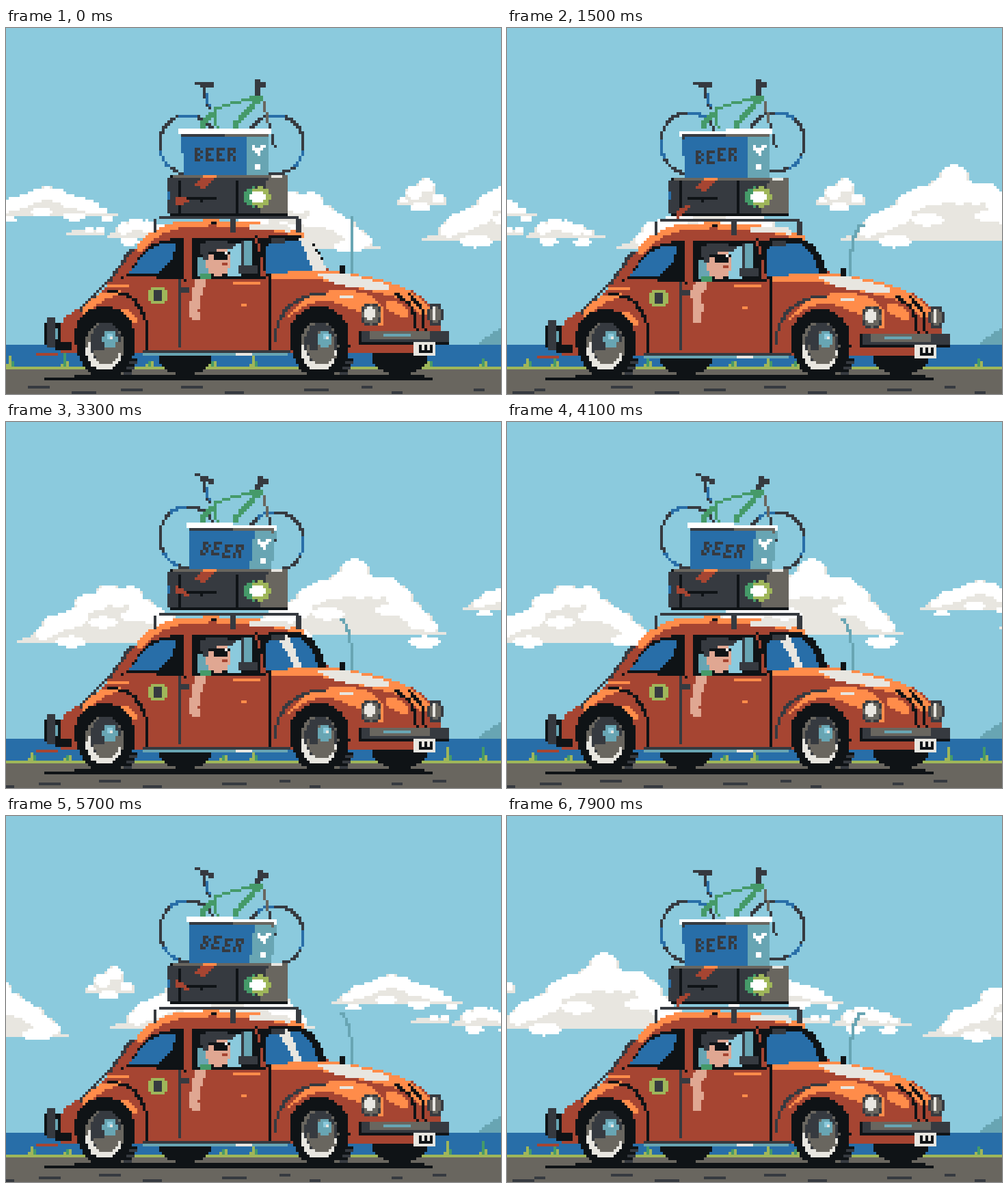
Write an HTML page with a canvas that moves like this. It is 724 px wide and 535 px high and loops after 8 s.

```html
<!DOCTYPE html>
<html lang="en">
<head>
<meta charset="utf-8">
<title>Road trip</title>
<style>
html, body { margin: 0; width: 100%; height: 100%; overflow: hidden; background: #8bcadd; }
canvas { position: absolute; left: 0; top: -1px; width: 724px; height: 536px; image-rendering: pixelated; }
</style>
</head>
<body>
<canvas width="181" height="134" role="img" aria-label="Loaded car on a coast road, cooler box marked BEER"></canvas>
<script>
const ctx = document.querySelector('canvas').getContext('2d');
const K = '#0f1316', D = '#363a40', G = '#69665f', R = '#a64532', O = '#ff8c4a', W = '#fff', C = '#e8e6e0',
  S = '#8bcadd', T = '#68a5b3', B = '#286ea8', V = '#459a69', L = '#9fb65a', SKIN = '#e0a792';
let ox = 0, oy = 0;

const rand = seed => {
  const v = Math.sin(seed * 127.1 + 3.7) * 43758.5453;
  return v - Math.floor(v);
};

// All shapes are snapped to whole cells, without smoothing.
function rect(color, x, y, w, h) {
  ctx.fillStyle = color;
  ctx.fillRect(Math.round(x + ox), Math.round(y + oy), w, h);
}
function poly(color, ...p) {
  const ys = p.filter((_, i) => i % 2);
  for (let y = Math.floor(Math.min(...ys)); y < Math.max(...ys); y++) {
    const xs = [], m = y + .5;
    for (let i = 0; i < p.length; i += 2) {
      const j = (i + 2) % p.length, y0 = p[i + 1], y1 = p[j + 1];
      if ((y0 <= m) !== (y1 <= m)) xs.push(p[i] + (m - y0) / (y1 - y0) * (p[j] - p[i]));
    }
    xs.sort((a, b) => a - b);
    for (let i = 0; i + 1 < xs.length; i += 2) {
      const x = Math.round(xs[i]);
      rect(color, x, y, Math.round(xs[i + 1]) - x, 1);
    }
  }
}
// Catmull-Rom curve through key points; a doubled point makes a corner.
function spline(p, closed, steps) {
  const n = p.length / 2, out = [];
  const at = (i, axis) => p[2 * (closed ? (i + n) % n : Math.min(n - 1, Math.max(0, i))) + axis];
  for (let i = 0; i < (closed ? n : n - 1); i++)
    for (let k = 0; k <= steps; k++)
      for (const axis of [0, 1]) {
        const t = k / steps, [a, b, c, d] = [-1, 0, 1, 2].map(j => at(i + j, axis));
        out.push(b + t / 2 * (c - a + t * (2 * a - 5 * b + 4 * c - d + t * (3 * (b - c) + d - a))));
      }
  return out;
}
const blob = (color, ...p) => poly(color, ...spline(p, true, 6));
function stroke(color, width, ...p) {
  const q = spline(p, false, 26);
  for (let i = 0; i < q.length; i += 2) rect(color, Math.floor(q[i]), Math.floor(q[i + 1]), width, width);
}
function oval(color, cx, cy, rx, ry) {
  for (let y = Math.floor(cy - ry); y < cy + ry; y++) {
    const k = 1 - ((y + .5 - cy) / ry) ** 2;
    if (k <= 0) continue;
    const x = Math.round(cx - rx * Math.sqrt(k));
    rect(color, x, y, Math.round(cx + rx * Math.sqrt(k)) - x, 1);
  }
}
// Repeats a 240-cell wide strip that has moved left by `shift`.
function scroll(shift, draw) {
  for (const k of [-240, 0, 240]) {
    ox = k - shift % 240;
    draw();
  }
  ox = 0;
}

// A flat base with puffs that rise towards the peak, lit from above.
function cloud(x, width, base, height, peak) {
  const count = Math.round(width / 4), puffs = [];
  for (let i = 0; i < count; i++) {
    const t = (i + .5) / count, edge = Math.min(t / peak, (1 - t) / (1 - peak));
    const tall = 1 + height * Math.max(0, edge * 1.2 - .15) ** .7 * (.8 + .25 * rand(i + x));
    puffs.push({ x: x + width * t, top: base - tall, r: Math.min(tall / 2, 2 + height / 10) });
  }
  rect(C, x, base - 1, width, 1);
  rect(C, x + 2, base - 2, width - 6, 1);
  for (const p of puffs) {
    oval(C, p.x, p.top + p.r, p.r * 1.2, p.r);
    poly(C, p.x - p.r * 1.2,p.top + p.r, p.x + p.r * 1.2,p.top + p.r, p.x + p.r * 1.2,base, p.x - p.r * 1.2,base);
  }
  puffs.forEach((p, i) => {
    if (p.r < 1.5) return;
    oval(W, p.x, p.top + p.r * .8, p.r, p.r * .8);
    if (i % 3 === 1) oval(W, p.x + 2, p.top + p.r * 2.6, p.r * 1.3, p.r * .5);
  });
}
function clouds() {
  cloud(-7, 48, 69, 11, .45);
  cloud(22, 14, 76, 3, .8);
  cloud(37, 29, 77, 7, .35);
  cloud(70, 67, 81, 22, .57);
  cloud(143, 17, 65, 10, .6);
  cloud(152, 75, 78, 26, .57);
}

function roadside() {
  for (let i = 0; i < 16; i++) {
    const x = 15 * i + Math.floor(12 * rand(i)), h = 2 + Math.floor(4 * rand(i + 40));
    rect(i % 2 ? V : L, x, 124 - h, 1, h);
    rect(i % 2 ? L : V, x + 1, 122, 1, 2);
    rect(L, x - 1, 123, 1, 1);
  }
  for (let i = 0; i < 12; i++)
    rect(D, 20 * i + 14 * rand(i + 80), 131 + i * 2 % 3, 3 + Math.floor(7 * rand(i + 60)), 1);
}

function bike(s) {
  const ring = (cx, cy, ry) => {
    for (let a = 0; a < 6.28; a += .03) {
      const x = cx + 10.3 * Math.cos(a), y = cy + ry * Math.sin(a);
      rect(Math.sin(a * 3 + s) > .55 ? B : D, Math.floor(x), Math.floor(y), 1, 1);
    }
  };
  ring(66.5, s ? 42.3 : 42.8, s ? 11.2 : 10.8);
  ring(98.5, 42.8 + s, 10.8);
  stroke(D, 1, 72,22, 74,29);
  stroke(B, 1, 73,24, 74,28);
  stroke(V, 1, 76,30, 92,25);
  for (const k of [0, 1]) {
    stroke(V, 1, 92 + k,26, 83 + k,36);
    stroke(V, 1, 75,31 + k, 71 + k,36);
  }
  stroke(V, 1, 76,31, 77,36);
  rect(V, 89, 25, 5, 2);
  stroke(G, 1, 94,27, 96,35);
  stroke(D, 1, 96,35, 98,43);
  for (let i = 0; i < 7; i++)
    rect(D, 69 + i - (s < 0), 20 + (s > 0 ? Math.round((i - 3) / 3) : 0), 1, i > 1 ? 2 : 1);
  // stem and bars
  rect(D, 91 + Math.max(s, 0), 19 + Math.max(s, 0), 2, 4);
  rect(D, 93 + Math.max(s, 0), 20 + Math.max(s, 0), 2, 2);
  rect(D, 91, 23, 2, 2);
}

// Rows of three cells each, as bits.
const glyphs = { B: [6, 5, 6, 5, 6], E: [7, 4, 6, 4, 7], R: [7, 5, 6, 5, 5] };
function cooler(s) {
  const dx = s > 0 ? 3 : 0, left = 37 + (s < 0), right = 37 + (s > 0), bottom = 54 + Math.abs(s);
  poly(B, 64 + dx,39, 88 + dx,39, 88 + dx / 3,bottom, 65 + dx * .7,bottom);
  poly(T, 88 + dx,39, 96 + dx,39, 96 + dx / 3,bottom, 88 + dx / 3,bottom);
  poly(W, 63 + dx,left, 97 + dx * .7,right, 97 + dx * .7,right + 2, 63 + dx,left + 2);
  stroke(D, 1, 64 + dx,left + 2, 79 + dx,39);
  stroke(G, 1, 80 + dx,39, 95 + dx * .8,right + 2);
  const x = 90 + Math.max(0, s) * 2;
  stroke(W, 1, x,43, x + 2,46, x + 4,43);
  rect(W, x + 1, 50, 2, 2);
  [...'BEER'].forEach((ch, i) => glyphs[ch].forEach((bits, row) => {
    const x0 = 69 + i * 4 + (s > 0 ? 3 - (row > 2) : 0);
    const y0 = 44 + row + (s > 0 ? i >> 1 : s < 0 ? 1 - (i >> 1) : 0);
    for (let k = 0; k < 3; k++) if (bits & 4 >> k) rect(D, x0 + k, y0, 1, 1);
  }));
}

function suitcase(s) {
  const top = 54 + (s < 0);
  rect(K, 60, top, 43, 69 - top);
  rect(D, 59, top + 1, 43, 67 - top);
  poly(G, 96,top, 103,top, 103,68, 93,68);
  rect(G, 61, top, 36, 1);
  rect(C, 97, top, 4, 1);
  rect(B, 59, 60, 1, 3);
  for (const x of [63, 84]) rect(K, x, 56, 1, 12);
  rect(O, 72, top, 5, 1);
  poly(R, 71,top + 1, 76,top + 1, 73,top + 5, 69,top + 4);
  stroke(K, 1, 66,62, 71,63, 76,62);
  const tag = 62 + (s < 0 ? 3 : 0);
  poly(R, 62,tag - s * 2, 66,tag, 67,tag + 2 - (s < 0), 62,tag + 3 - s * 2);
  oval(V, 90.5, 62, 3.6, 3.6);
  oval(L, 93, 62, 3.6, 3.6);
  oval(W, 92, 62, 3, 2.5);
}

function rack() {
  rect(D, 56, 69, 51, 1);
  for (const x of [54, 82, 106]) rect(D, x, 70, x > 54 ? 2 : 1, 5);
  rect(K, 75, 71, 2, 1);
}

function driver(s) {
  poly(K, 68,77, 91,77, 93,84, 93,92, 68,92);
  rect(T, 70, 84, 4, 7);
  rect(S, 81, 79, 5, 12);
  rect(T, 87, 78, 3, 12);
  rect(D, 86, 78, 1, 9);
  oval(SKIN, 77.5, 85.5, 4.5, 5.5);
  blob(D, 71,80, 75,78, 83,79, 82,81, 75,82, 73,86);
  rect(K, 74, 82, 8, 1);
  rect(K, 76, 83, 5, 2);
  rect(W, 80, 82, 1, 1);
  rect(R, 79, 86, 2, 1);
  rect(D, 85, 87, 7, 3);
  rect(V, 71, 90, 4, 2);
  stroke(SKIN, 3, 70,92, s < 0 ? 68 : 69,95, s < 0 ? 69 : 68,100, 68,104);
}

function glass(phase) {
  blob(K, 44,91, 44,91, 51,81, 58,78, 65,77, 65,77, 65,92, 65,92);
  poly(B, 45,90, 51,82, 57,79, 62,79, 61,85, 55,90);
  blob(K, 92,77, 92,77, 106,76, 113,80, 118,90, 118,90, 95,91, 95,91);
  poly(B, 95,90, 95,81, 97,78, 107,78, 111,81, 115,90);
  // a reflection slides across the windscreen
  const x = 107 - 8 * phase;
  if (phase < 2) poly(C, x,77, x + 4,77, x + 11 - phase,90, x + 6 + phase,90);
  rect(D, 97, 77, 5, 2);
}

function lamp(cx, rx) {
  oval(D, cx, 105, rx, 4.4);
  oval(G, cx, 105, rx - .8, 3.6);
  oval(C, cx - .5, 104.5, rx - 2, 2.6);
}

function body(s, phase) {
  blob(R, 20,119, 20,119, 21,107, 34,98, 42,86, 55,75, 70,71, 92,72, 108,76, 118,89, 118,89, 140,93, 155,101, 160,113, 160,113, 149,119, 149,119);
  // roof and rear
  stroke(O, 2, 48,80, 58,73, 72,71, 92,72, 107,75);
  stroke(C, 2, 89,72, 102,73);
  stroke(D, 1, 27,103, 38,92, 46,81);
  stroke(O, 1, 37,94, 44,94);
  stroke(O, 2, 28,104, 33,99, 40,96);
  stroke(O, 2, 42,103, 46,106);
  stroke(K, 1, 37,96, 46,99, 51,107, 51,117);
  glass(phase);
  rect(K, 122, 87, 2, 3);
  // rear bumper
  rect(K, 14, 108, 6, 8);
  rect(D, 15, 106, 3, 11);
  rect(T, 18, 110, 1, 4);
  rect(K, 18, 115, 6, 3);
  // hood and front fender
  blob(O, 97,90, 97,90, 117,89, 140,93, 154,101, 152,105, 143,99, 127,95, 112,92, 97,92);
  blob(C, 114,90, 123,90, 139,94, 137,96, 122,94);
  blob(O, 103,106, 110,99, 122,96, 133,98, 138,103, 137,109, 129,104, 117,100, 109,102);
  rect(C, 122, 98, 5, 1);
  stroke(O, 3, 139,100, 144,103);
  stroke(K, 1, 142,97, 148,102, 150,110);
  stroke(K, 1, 147,97, 152,103, 153,110);
  stroke(D, 1, 98,114, 101,105, 108,99, 116,97);
  // doors and sill
  rect(D, 63, 92, 1, 25);
  rect(K, 96, 91, 1, 27);
  rect(D, 50, 118, 54, 1);
  rect(T, 50, 119, 53, 1);
  rect(C, 84, 119, 6, 1);
  rect(D, 63, 95, 4, 2);
  rect(O, 83, 93, 10, 1);
  rect(O, 86, 101, 2, 1);
  oval(L, 55.5, 98, 3.6, 3.3);
  oval(D, 55.5, 98, 2, 2);
  driver(s);
  // arches, lamps, front bumper
  for (const x of [36, 114.5]) oval(K, x, 113, 11, 11);
  lamp(133.5, 4);
  lamp(157, 2.8);
  rect(K, 129, 111, 33, 5);
  rect(D, 130, 111, 32, 4);
  rect(G, 133, 111, 22, 3);
  rect(T, 138, 112, 10, 1);
  rect(C, 149, 115, 8, 5);
  for (const x of [151, 153, 155]) rect(K, x, 116, 1, 3);
  rect(K, 151, 118, 5, 1);
}

function wheel(cx) {
  oval(K, cx + .5, 116.5, 10.5, 11.5);
  for (let i = 0; i < 3; i++) {
    rect(K, cx + 7, 121 + 2 * i, 5 - i, 2);
    rect(D, cx + 9 - i, 122 + 2 * i, 3, 1);
  }
  oval(G, cx, 116.5, 7, 9);
  oval(C, cx - .2, 118.5, 6.4, 7);
  oval(D, cx + .5, 115.5, 5.8, 7.6);
  oval(G, cx + .8, 117, 5, 6.5);
  oval(D, cx - 2, 114, 2.4, 4.5);
  oval(T, cx + 2, 114, 2.6, 3.4);
  rect(S, cx + 1, 112, 2, 2);
  rect(C, cx + 2, 113, 1, 1);
}

function draw(n) {
  const phase = n % 4, s = Math.round(Math.sin(phase * Math.PI / 2)), bob = n % 2;
  rect(S, 0, 0, 181, 134);
  scroll(2 * n, clouds);
  poly(T, 173,116, 174,114, 181,110, 181,116);
  rect(B, 0, 116, 181, 8);
  rect(L, 0, 124, 181, 1);
  rect(G, 0, 125, 181, 9);
  scroll(30 * n, roadside);
  rect(K, 25, 127, 128, 1);
  rect(K, 14, 128, 142, 1);
  oval(K, 65.5, 121, 9.5, 6);
  oval(K, 144, 120, 10.5, 7);
  stroke(T, 1, 126,91, 126,81, 126 - s * 2,74, 126 - s * 4,69 + 3 * bob);
  bike(s);
  cooler(s);
  suitcase(s);
  oy = bob;
  body(s, phase);
  rack();
  oy = 0;
  wheel(36);
  wheel(114.5);
}

let shown = -1;
function tick() {
  const n = Math.floor(performance.now() % 8000 / 100);
  if (n !== shown) draw(shown = n);
  requestAnimationFrame(tick);
}
tick();
</script>
</body>
</html>
```
